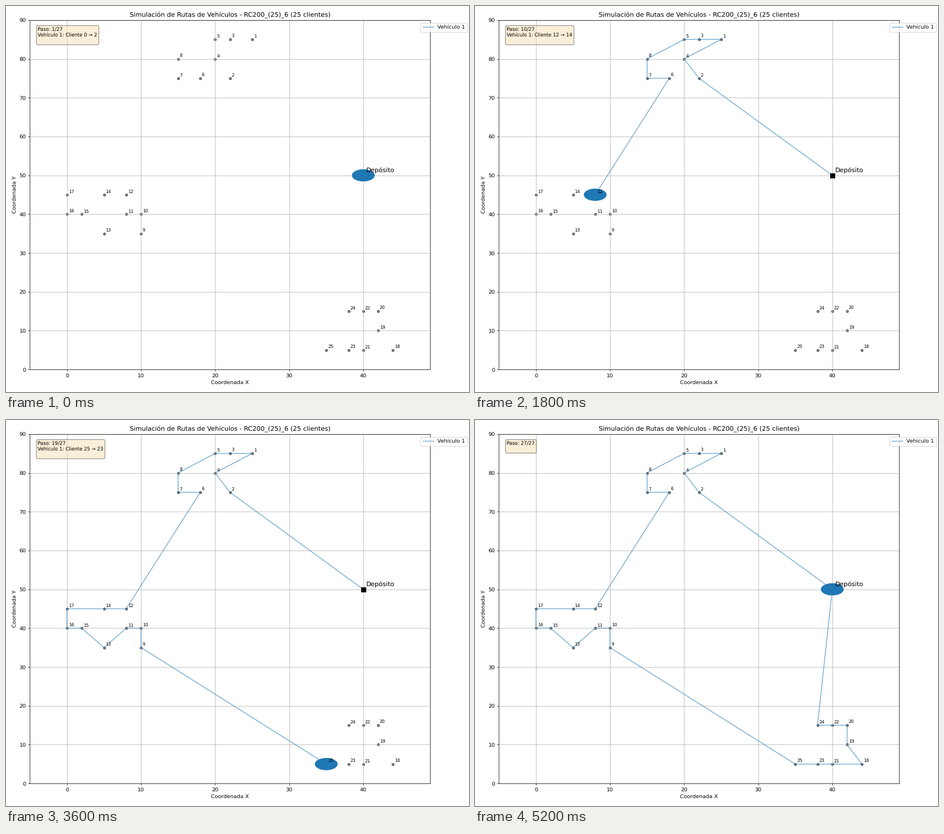
Animation, 820 px wide and 683 px high, one loop 5.4 s. Source, as a matplotlib script:

```python
from itertools import permutations

import matplotlib.pyplot as plt
import numpy as np
from matplotlib.animation import FuncAnimation
from matplotlib.patches import Circle

W, H = 820, 683
DPI = W / 12
LEFT, RIGHT, TOP, BOTTOM = 42.3, 750.9, 24.8, 643.2
DEPOT = (40, 50)
CLUSTERS = [
    [(25, 85), (22, 75), (22, 85), (20, 80), (20, 85), (18, 75), (15, 75), (15, 80)],
    [(10, 35), (10, 40), (8, 40), (8, 45), (5, 35), (5, 45), (2, 40), (0, 40), (0, 45)],
    [(44, 5), (42, 10), (42, 15), (40, 5), (40, 15), (38, 5), (38, 15), (35, 5)],
]
PLACES = np.array([DEPOT] + sum(CLUSTERS, []))
DIST = np.hypot(*(PLACES[:, None] - PLACES).T)


def shortest(cluster, start, goal):
    """Order of the cluster's clients on the shortest way from start to goal."""
    orders = np.array(list(permutations(cluster)))
    stops = np.pad(orders, ((0, 0), (1, 1)), constant_values=((0, 0), (start, goal)))
    return orders[DIST[stops[:, :-1], stops[:, 1:]].sum(axis=1).argmin()]


def plan():
    """Visit the clusters in turn, each time heading for the next one's first client."""
    route, first = [0], 1
    for cluster in CLUSTERS:
        after = first + len(cluster)
        route.extend(shortest(range(first, after), route[-1], after % len(PLACES)))
        first = after
    return route + [0]


ROUTE = plan()
STEPS = len(ROUTE)
PATH = PLACES[ROUTE]

plt.rcParams.update({"font.family": "DejaVu Sans", "text.hinting": "none"})

# The small surplus guards against rounding down to a pixel less
fig = plt.figure(figsize=((W + 1e-3) / DPI, (H + 1e-3) / DPI), dpi=DPI)
ax = fig.add_axes([LEFT / W, 1 - BOTTOM / H, (RIGHT - LEFT) / W, (BOTTOM - TOP) / H])
ax.set(xlim=(-5, 49), ylim=(0, 90), xlabel="Coordenada X", ylabel="Coordenada Y",
       xticks=range(0, 50, 10), yticks=range(0, 100, 10))
ax.set_title("Simulación de Rutas de Vehículos - RC200_(25)_6 (25 clientes)")
ax.grid(True)


def label(text, place, offset, size):
    ax.annotate(text, place, xytext=(offset, offset),
                textcoords="offset points", fontsize=size)


ax.scatter(*PLACES[1:].T, s=20, c="black", alpha=0.5)
for number, place in enumerate(PLACES[1:], 1):
    label(str(number), place, 3, 8)

ax.plot(*DEPOT, "ks", markersize=8, zorder=2.2)
label("Depósito", DEPOT, 5, 12)

trail, = ax.plot([], [], color="C0", alpha=0.6, label="Vehículo 1")
vehicle = ax.add_patch(Circle(DEPOT, 1.5, color="C0", zorder=2.5))
status = ax.text(0.02, 0.98, "", transform=ax.transAxes, fontsize=9, va="top",
                 bbox=dict(boxstyle="round", facecolor="wheat", alpha=0.5))
ax.legend(loc="upper right", bbox_to_anchor=(1.1, 1))


def update(step):
    trail.set_data(*PATH[:step + 1].T)
    vehicle.center = PATH[step]
    text = f"Paso: {step + 1}/{STEPS}\n"
    if step + 1 < STEPS:
        text += f"Vehículo 1: Cliente {ROUTE[step]} → {ROUTE[step + 1]}\n"
    status.set_text(text)
    return trail, vehicle, status


anim = FuncAnimation(fig, update, frames=STEPS, interval=200, repeat=True, repeat_delay=0)
plt.show()
```
